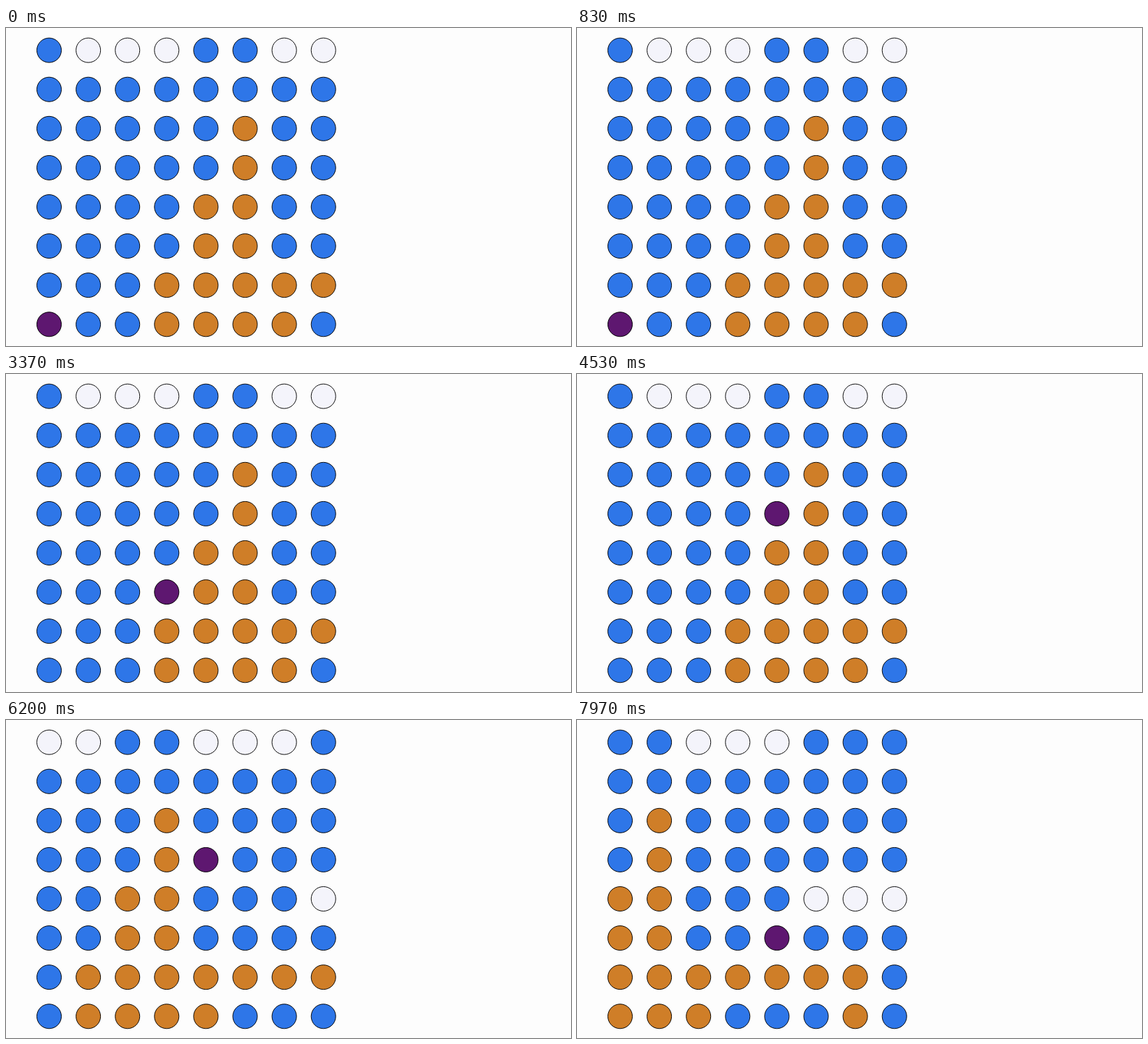
An HTML page for the animation above (8 s loop, 852 by 480 pixels).

```html
<!DOCTYPE html>
<html lang="en">
<head>
<meta charset="utf-8">
<title>Dot matrix platformer</title>
<style>
  html, body { margin: 0; width: 100%; height: 100%; overflow: hidden; background: #fdfdfd; }
  svg { display: block; }
  circle { stroke: #000; stroke-width: 1; }
  .sky { fill: #2e76e8; }
  .cloud { fill: #f4f4fb; }
  .ground { fill: #cf7e28; }
  .player { fill: #5e1770; }
</style>
</head>
<body>
<svg id="stage" width="852" height="480" viewBox="0 0 852 480"></svg>
<script>
const LOOP = 8000, BEAT = 1250 / 3, FIRST_BEAT = 63;
const SIZE = 8, SPACING = 59.1, PLAYER_COLUMN = 4, JUMP = 2;
const TILES = { '.': 'sky', o: 'cloud', '#': 'ground' };

const LEVEL = [
  '.ooo..ooo...',
  '............',
  '.....#......',
  '.....#......',
  '....##...ooo',
  '....##......',
  '...########.',
  '...####...#.',
];

// One key per beat: R = step right, U = jump, . = wait
const KEYS = '...RRUR..URURR...RR';

const isSolid = (x, y) => y >= SIZE || LEVEL[y][x] === '#';

// A jump hangs for its beat; otherwise the player moves, then falls one row if unsupported.
function advance({ x, y }, key) {
  if (key === 'U') return { x, y: y - JUMP };
  if (key === 'R') x++;
  return { x, y: isSolid(x, y + 1) ? y : y + 1 };
}

function playerAt(time) {
  const beats = Math.floor((time - FIRST_BEAT) / BEAT) + 1;
  return [...KEYS.slice(0, beats)].reduce(advance, { x: 0, y: SIZE - 1 });
}

const stage = document.getElementById('stage');

function makeDot(column, row) {
  const dot = document.createElementNS('http://www.w3.org/2000/svg', 'circle');
  dot.setAttribute('cx', 65 + column * SPACING);
  dot.setAttribute('cy', 33.6 + row * SPACING);
  dot.setAttribute('r', 18.5);
  stage.append(dot);
  return { dot, column, row };
}

const dots = Array.from({ length: SIZE * SIZE },
  (_, i) => makeDot(i % SIZE, Math.floor(i / SIZE)));

function draw(time) {
  const { x, y } = playerAt(time);
  const scroll = Math.max(0, x - PLAYER_COLUMN);
  for (const { dot, column, row } of dots) {
    const levelColumn = column + scroll;
    const isPlayer = levelColumn === x && row === y;
    dot.setAttribute('class', isPlayer ? 'player' : TILES[LEVEL[row][levelColumn]]);
  }
}

const begin = performance.now();
function tick() {
  draw((performance.now() - begin) % LOOP);
  requestAnimationFrame(tick);
}
tick();
</script>
</body>
</html>
```
